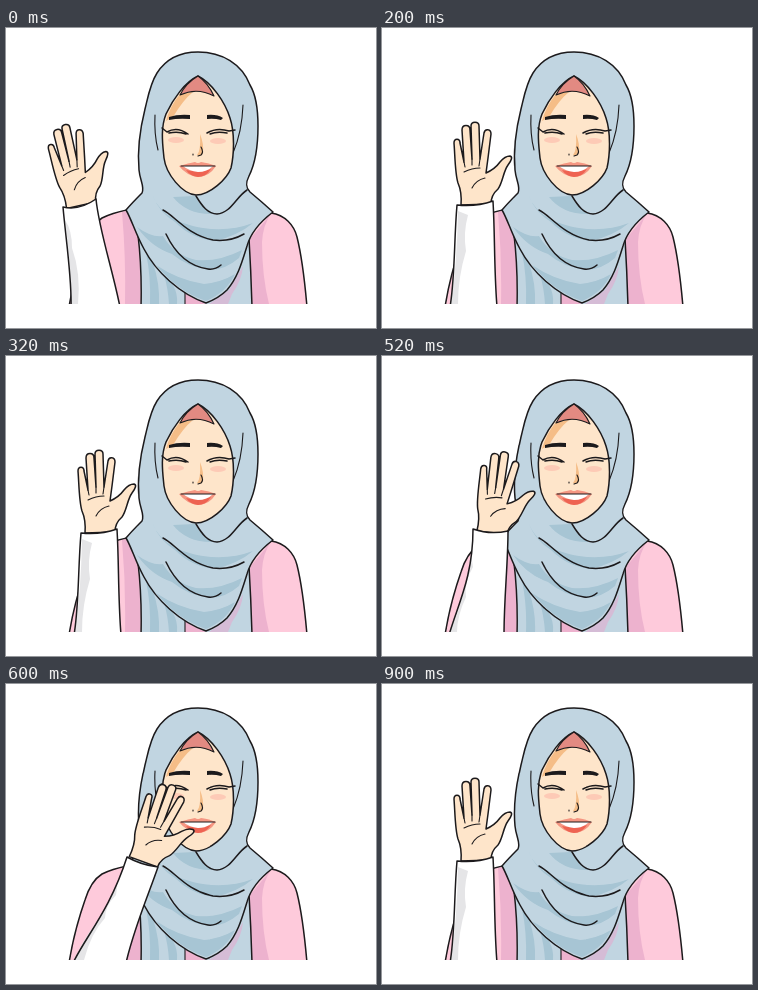
Recreate the animation shown at these times as an HTML page. Size 370x300 px, loop 1000 ms.

```html
<!DOCTYPE html>
<html lang="en">
<head>
<meta charset="utf-8">
<title>Waving hello</title>
<style>
  html, body { margin: 0; width: 100%; height: 100%; overflow: hidden; background: #fff; }
  svg { display: block; width: 100%; height: 100%; }
  path { fill: none; stroke-linecap: round; stroke-linejoin: round; }
  .ink { stroke: #1c1a1c; stroke-width: 1.5; }
  .thin { stroke: #1c1a1c; stroke-width: 1.1; }
  .black { fill: #1c1a1c; }
  .pink { fill: #fecadb; }
  .mauve { fill: #edb2ce; }
  .blue { fill: #c1d5e1; }
  .fold { fill: #a7c5d4; }
  .lilac { fill: #d5bcd6; }
  .skin { fill: #fee5ca; }
  .tan { fill: #f5bd87; }
  .cap { fill: #e28a82; }
  .lip { fill: #f59682; }
  .red { fill: #ee6352; }
  .white { fill: #fff; }
  .grey { fill: #e5e5e7; }
</style>
</head>
<body>
<svg viewBox="0 0 370 300">
  <clipPath id="stage"><rect width="370" height="276"/></clipPath>
  <g clip-path="url(#stage)">
    <!-- dress -->
    <path class="pink ink" d="M63 279C66 260 71 239 79 216C83 203 88 195 96 190Q106 185 121 182L265 185C279 187 288 197 291 209C297 233 299 256 301 279Z"/>
    <path class="mauve" d="M116 184L121 183L134 209V276H119Q120 230 116 184ZM265 186Q257 197 256 214Q256 248 263 276H245L243 212Z"/>

    <!-- scarf tails -->
    <path class="blue ink" d="M132 207Q136 240 135 279H246Q245 244 243 210L200 250Z"/>
    <path class="fold" d="M140 225L147 235Q154 256 153 276H144Q145 248 140 225ZM158 247L167 257Q172 266 171 276H163Q162 260 158 247Z"/>
    <path class="mauve" d="M179 265L200 276H179Z"/>
    <path class="lilac" d="M203 276L223 262L237 238Q236 252 226 266L222 276Z"/>
    <path class="thin" d="M179 264V278"/>

    <!-- head scarf -->
    <path class="blue ink" d="M192 24C175 24 160 31 151 45C144 56 142 69 139 81C134 101 131 120 133 142C134 153 139 159 136 165Q126 175 120 182C125 190 130 207 138 221C150 244 174 266 200 275Q213 270 221 262C232 249 236 234 241 218Q246 200 267 184Q256 174 244 164C239 159 240 154 243 148C249 136 252 118 252 98C252 82 250 67 244 57C236 36 216 24 192 24Z"/>
    <path class="fold" d="M147 168C154 186 172 196 197 200Q223 204 247 195Q233 207 209 213Q186 211 169 194Q153 184 147 168ZM167 169L189 168Q196 182 208 186Q181 187 167 169ZM131 199Q146 210 157 208Q168 227 190 232Q213 234 236 222L233 230Q219 242 204 242Q183 240 166 226Q145 219 131 199ZM150 237Q172 252 198 256Q216 254 229 246Q221 264 200 273Q171 263 150 237Z"/>
    <path class="ink" d="M157 182C168 187 181 207 207 212Q224 214 238 206M160 206C168 223 181 238 202 241Q209 242 215 237M190 168C196 178 202 186 211 186C225 185 230 169 241 162"/>
    <path class="thin" d="M149 87Q148 106 152 122M237 77Q236 104 227 125"/>

    <!-- face -->
    <path class="skin ink" d="M192 48C179 54 167 71 160 86C154 101 157 119 158 130C160 146 176 166 190 167C204 167 221 151 225 140C228 127 229 105 224 90C219 74 206 55 192 48Z"/>
    <path class="tan" d="M174 66L187 64Q177 72 167 89L160 93Q164 78 174 66Z"/>
    <path class="cap thin" d="M192 48Q180 55 174 67Q191 59 208 68Q202 55 192 48Z"/>
    <g fill="#fdcab6">
      <ellipse cx="170" cy="112" rx="8" ry="3"/>
      <ellipse cx="212" cy="113" rx="8" ry="3"/>
    </g>
    <path class="black" d="M163 89Q172 86 184 87V91Q172 90 163 92ZM201 87Q211 86 217 90L215 92Q208 90 201 91Z"/>
    <path class="ink" d="M156 100L161 104Q171 98 182 106M163 105Q172 103 180 106M229 102L223 103Q211 99 201 105M221 105Q211 103 204 106"/>
    <path class="tan" d="M194 106Q198 116 197 125Q195 129 191 127Q195 123 194 106Z"/>
    <path class="thin" d="M195 119Q198 124 195 127L192 128M187 126V127"/>
    <path class="lip" d="M173 138Q183 135 189 134Q192 136 195 134Q203 135 210 138Q203 149 192 149Q181 148 173 138Z"/>
    <path class="red" d="M180 142Q192 145 205 141Q200 149 192 149Q184 148 180 142Z"/>
    <path class="white" d="M177 138Q192 138 207 138Q201 144 192 144Q183 143 177 138Z"/>
    <path class="thin" d="M175 138Q192 138 209 138"/>

    <!-- waving arm -->
    <g id="hand">
      <path class="skin ink" d="M79 176Q80 163 76 154C73 145 73 126 72 114C72 109 78 109 78 114L82 133L80 101C80 95 88 95 88 101L90 130L89 97C89 92 97 92 97 97L98 130L102 104C103 99 109 100 109 105L106 129L104 144Q113 140 118 133Q123 127 128 127Q132 128 126 136C121 143 121 153 116 160Q109 166 109 175Z"/>
      <path class="thin" d="M82 133L83 138M90 130V136M98 130L97 137M90 159Q94 151 103 149M82 143Q90 139 98 139"/>
    </g>
    <path id="sleeve" class="white"/>
    <path id="shade" class="grey"/>
    <path id="edge" class="ink"/>
  </g>
</svg>
<script>
  const part = id => document.getElementById(id);

  // Wrist position and tilt, sleeve outline and the shadow along its left side.
  const poses = [
    { x: 74, y: 176, tilt: -10.5,
      sleeve: "M57 179Q73 183 90 171C93 202 106 239 114 279H65C66 251 60 213 57 179Z",
      shade: "M59 192Q66 202 66 220Q75 245 72 276H65Q65 235 59 192Z" },
    { x: 93, y: 175, tilt: 0,
      sleeve: "M75 177Q94 179 111 173C113 207 112 242 115 279H68C73 251 72 211 75 177Z",
      shade: "M76 183L86 187Q81 205 84 223Q76 249 76 276H69Q75 236 76 183Z" },
    { x: 109, y: 175.5, tilt: 10,
      sleeve: "M91 173Q108 179 126 175C126 208 122 242 122 279H67C76 248 91 221 91 173Z",
      shade: "M89 198L91 211Q82 226 84 241Q75 260 75 276H68Q85 236 89 198Z" },
    { x: 137, y: 176, tilt: 22,
      sleeve: "M121 173Q135 181 152 183C142 212 128 244 120 279H67C80 252 104 226 121 173Z",
      shade: "M112 196L110 211Q99 222 99 234Q85 249 78 276H68Q80 250 96 231Q106 215 112 196Z" }
  ];
  const timeline = [[0, 0], [200, 1], [400, 2], [600, 3], [800, 2], [900, 1]];

  function draw() {
    const time = performance.now() % 1000;
    const [, index] = timeline.findLast(([start]) => time >= start);
    const { x, y, tilt, sleeve, shade } = poses[index];
    part("hand").setAttribute("transform", `translate(${x} ${y}) rotate(${tilt}) translate(-93 -174)`);
    part("sleeve").setAttribute("d", sleeve);
    part("shade").setAttribute("d", shade);
    part("edge").setAttribute("d", sleeve);
    requestAnimationFrame(draw);
  }
  draw();
</script>
</body>
</html>
```
